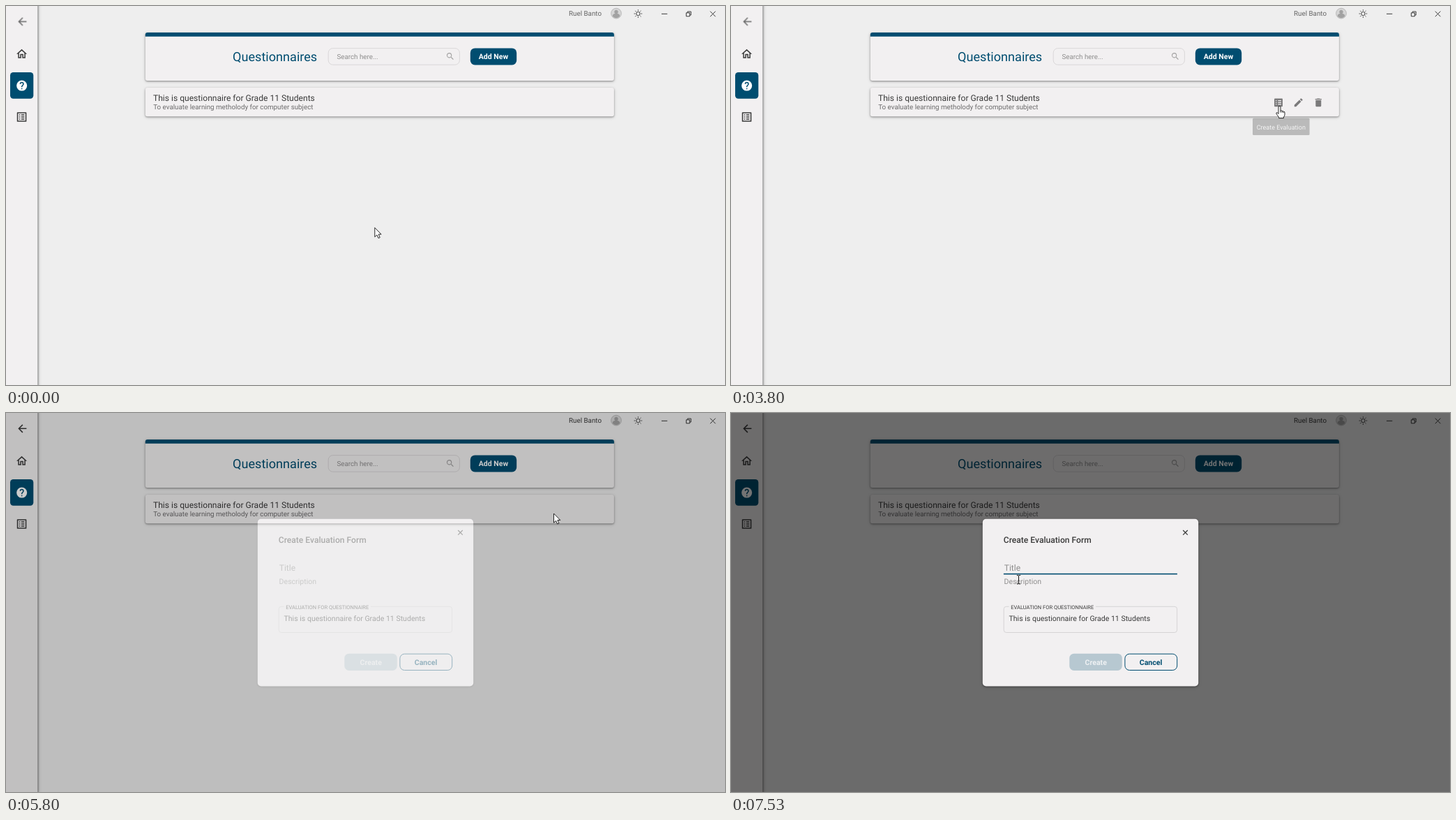
An HTML page for the animation above (8000 ms loop, 1031x543 px).

```html
<!DOCTYPE html>
<html lang="en">
<head>
<meta charset="utf-8">
<title>Questionnaires</title>
<style>
  html, body { margin: 0; width: 100%; height: 100%; overflow: hidden; background: #eee; }
  svg { display: block; width: 1031px; height: 543px; font: 9.81px Roboto, sans-serif; text-rendering: geometricPrecision; }
  .s10 { font-size: 7.55px; }
  .s12 { font-size: 9.06px; }
  .s14 { font-size: 10.57px; }
  .s16 { font-size: 12.08px; }
  .s24 { font-size: 18.11px; }
  .medium { font-weight: 500; }
  .bold { font-weight: 700; }
  .mid { text-anchor: middle; }
  .paper { fill: #f2f0f1; }
  .navy { fill: #004d70; }
  .dark { fill: #3a3a3a; }
  .grey { fill: #6c6b6c; }
  .hint { fill: #8f8e8e; }
  .line { fill: none; stroke: #3a3a3a; }
  .shadow { filter: drop-shadow(0 1px 1px rgba(0,0,0,.32)) drop-shadow(0 1px 2px rgba(0,0,0,.18)); }
  .side { filter: drop-shadow(1px 0 1px rgba(0,0,0,.4)) drop-shadow(1px 0 2px rgba(0,0,0,.18)); }
  .pointer { fill: #fff; stroke: #111; stroke-width: .9; stroke-linejoin: round; }
</style>
</head>
<body>
<svg viewBox="0 0 1031 543">
  <defs>
    <path id="i-back" d="M20 11H7.83l5.59-5.59L12 4l-8 8 8 8 1.41-1.41L7.83 13H20z"/>
    <path id="i-home" d="M12 5.69l5 4.5V18h-2v-6H9v6H7v-7.81l5-4.5M12 3L2 12h3v8h6v-6h2v6h6v-8h3z"/>
    <path id="i-help" d="M12 2a10 10 0 1 0 0 20 10 10 0 0 0 0-20zm1 17h-2v-2h2zm2.07-7.75l-.9.92C13.45 12.9 13 13.5 13 15h-2v-.5c0-1.1.45-2.1 1.17-2.83l1.24-1.26c.37-.36.59-.86.59-1.41a2 2 0 0 0-4 0H8a4 4 0 0 1 8 0c0 .88-.36 1.68-.93 2.25z"/>
    <path id="i-list" fill-rule="evenodd" d="M3.9 3h16.2q.9 0 .9.9v16.2q0 .9-.9.9H3.9q-.9 0-.9-.9V3.9q0-.9.9-.9zM5 5v14h14V5zM11 7h6v2h-6zm0 4h6v2h-6zm0 4h6v2h-6zM7 7h2v2H7zm0 4h2v2H7zm0 4h2v2H7z"/>
    <path id="i-form" fill-rule="evenodd" d="M4.5 3h15q1.5 0 1.5 1.5v15q0 1.5-1.5 1.5h-15Q3 21 3 19.5v-15Q3 3 4.5 3zM11 7h7v2h-7zm0 4h7v2h-7zm0 4h7v2h-7zM6 7h2v2H6zm0 4h2v2H6zm0 4h2v2H6z"/>
    <path id="i-edit" d="M3 17.25V21h3.75L17.81 9.94l-3.75-3.75zM20.71 7.04c.39-.39.39-1.02 0-1.41l-2.34-2.34c-.39-.39-1.02-.39-1.41 0l-1.83 1.83 3.75 3.75z"/>
    <path id="i-bin" d="M6 19q0 2 2 2h8q2 0 2-2V7H6zM19 4h-3.5l-1-1h-5l-1 1H5v2h14z"/>
    <path id="i-find" d="M15.5 14h-.79l-.28-.27A6.5 6.5 0 1 0 13.73 14.43l.27.28v.79l5 4.99L20.49 19zm-6 0a4.5 4.5 0 1 1 0-9 4.5 4.5 0 0 1 0 9z"/>
  </defs>

  <rect width="1031" height="543" fill="#eee"/>
  <rect class="paper side" y="-9" width="45.3" height="561"/>
  <use href="#i-home" class="dark" transform="translate(13.5 59.6) scale(.755)"/>
  <rect class="navy" x="6" y="95" width="33.3" height="37.8" rx="4.5"/>
  <use href="#i-help" fill="#fff" transform="translate(13.6 105) scale(.755)"/>
  <use href="#i-list" class="dark" transform="translate(13.5 150) scale(.755)"/>

  <g id="titlebar">
    <use href="#i-back" class="dark" transform="translate(14.3 13.3) scale(.755)"/>
    <text class="dark" x="807" y="14">Ruel Banto</text>
  </g>
  <circle cx="875" cy="10.6" r="7.4" fill="#d6d6d6" stroke="#aaa" stroke-width=".7"/>
  <path d="M875 5.8a2.7 2.7 0 0 1 1.5 5q3.6.6 3.9 3.8a7 7 0 0 1-10.8 0q.3-3.2 3.9-3.8a2.7 2.7 0 0 1 1.5-5z" fill="#a2a2a2"/>
  <circle class="line" cx="906.4" cy="11" r="2.7"/>
  <path id="rays" class="line"/>
  <path class="line" d="M940 11.3h8.3M975.4 9.8h5v5h-5zM977.2 9.6V8h5v5h-1.6M1009.8 7.6l7.6 7.6m0-7.6l-7.6 7.6"/>

  <rect class="paper shadow" x="199.8" y="38" width="672.1" height="69" rx="3"/>
  <path class="navy" d="M199.8 43.8V41q0-3 3-3h666.1q3 0 3 3v2.8z"/>
  <text class="navy s24" x="325" y="79.4">Questionnaires</text>
  <rect x="462.2" y="60.6" width="188.2" height="23.6" rx="6.5" fill="none" stroke="#d3d1d2" stroke-width=".8"/>
  <text class="hint" x="474.4" y="75.6">Search here...</text>
  <use href="#i-find" fill="#a3a2a2" transform="translate(630.2 65.3) scale(.57)"/>
  <rect class="navy" x="665.8" y="60.4" width="66.4" height="24" rx="6.5"/>
  <text class="bold s14 mid" x="699" y="76.3" fill="#fff">Add New</text>

  <rect class="paper shadow" x="199.8" y="117" width="672.1" height="41.2" rx="3"/>
  <text class="dark s16" x="211" y="136.2">This is questionnaire for Grade 11 Students</text>
  <text class="grey" x="211.2" y="148">To evaluate learning metholody for computer subject</text>
  <g id="actions" fill="#7b7a7b">
    <use id="form" href="#i-form" transform="translate(777.1 130.4) scale(.66)"/>
    <use href="#i-edit" transform="translate(805.8 130.4) scale(.66)"/>
    <use href="#i-bin" transform="translate(834.4 130.4) scale(.66)"/>
  </g>
  <g id="tooltip">
    <rect x="748" y="160.8" width="81.6" height="24.2" rx="1.5" fill="#616161"/>
    <text class="s12 mid" x="788.8" y="176.7" fill="#fff">Create Evaluation</text>
  </g>

  <g id="dialog">
    <rect width="1031" height="543" opacity=".55"/>
    <rect class="paper shadow" x="360.8" y="151.8" width="309.4" height="239.6" rx="5"/>
    <path class="line" d="M648.2 168l6.6 6.6m0-6.6l-6.6 6.6" stroke-width="1.3"/>
    <text class="dark medium s16" x="390.8" y="185.7">Create Evaluation Form</text>
    <text class="hint s16" x="391.7" y="225.8">Title</text>
    <rect id="underline" class="navy" y="229.8" height="1.6"/>
    <rect id="caret" x="392" y="214" width=".9" height="15" fill="#222"/>
    <text class="hint s14" x="391.6" y="244.6">Description</text>
    <path d="M398.6 277.3H394.8q-3.6 0-3.6 3.6v30q0 3.6 3.6 3.6h241.200q3.600 0 3.600-3.600v-30q0-3.600-3.600-3.600H523" fill="none" stroke="#cfcdce" stroke-width=".8"/>
    <text class="dark s10" x="401.2" y="280.6">EVALUATION FOR QUESTIONNAIRE</text>
    <text class="dark s14" x="398.5" y="298.2">This is questionnaire for Grade 11 Students</text>
    <rect x="485.3" y="344.7" width="75.5" height="24.2" rx="6.5" fill="#b7c8d1"/>
    <text class="bold s14 mid" x="523.2" y="360.6" fill="#eef1f3">Create</text>
    <rect x="564.9" y="345.2" width="74.800" height="23.300" rx="6.5" fill="none" stroke="#004d70"/>
    <text class="navy bold s14 mid" x="602" y="360.6">Cancel</text>
  </g>

  <g id="cursor">
    <path id="arrow" class="pointer" d="M0 0V13.200L3.100 10.400 5.200 15 7.400 14.100 5.400 9.500H9.300z"/>
    <path id="hand" class="pointer" d="M-.5 1Q-.5-.5 1-.5T2.500 1V6Q4 5.300 4.800 6.500 6.200 6 6.800 7.300 8.500 7 8.500 8.700V11.500Q8.500 13.500 7 15V16.600H0V15.200Q-2.200 12.500-3.600 10.100-3.800 8.500-2.200 8.700L-.5 10.500zM2.500 6V8.600M4.800 6.500V8.800M6.800 7.300V9"/>
    <path id="beam" fill="none" stroke="#111" d="M-2.600-6.200H-.6L0-5.600.6-6.200H2.600M0-5.600V5.600M-2.600 6.200H-.6L0 5.600.6 6.200H2.600"/>
  </g>
</svg>
<script>
const $ = id => document.getElementById(id);
const LOOP = 8000, FPS = 15;

// Pointer hot spot: tick, x, y
const path = [
  [14, 528.8, 317.6], [15, 532, 322], [17, 570, 341], [19, 645, 325], [21, 728, 268], [23, 779, 210], [24, 792.3, 197.600],
  [26, 792.3, 197.600], [27, 783, 189], [28, 752, 171], [29, 705, 156], [31, 641.300, 148],
  [34, 641.300, 148], [37, 682, 142], [41, 764, 140], [44, 785.500, 144],
  [64, 785.500, 144], [65, 782, 150], [66, 784, 158.500], [67, 788.500, 151], [68, 785.500, 144],
  [90, 785.500, 144], [93, 730, 225], [96, 590, 312], [99, 450, 268], [101, 408, 224],
  [102, 408, 224], [105, 409, 222], [107, 410, 227], [109, 412.500, 238.700]
];

const clamp = v => Math.max(0, Math.min(1, v));
const show = (id, on) => $(id).setAttribute('opacity', +on);

function pointerAt(tick) {
  const i = path.findIndex(p => p[0] > tick);
  if (i === 0) return path[0].slice(1);
  if (i < 0) return path.at(-1).slice(1);
  const [a, b] = [path[i - 1], path[i]];
  const u = (tick - a[0]) / (b[0] - a[0]);
  return [a[1] + (b[1] - a[1]) * u, a[2] + (b[2] - a[2]) * u];
}

// Fade that covers about three ticks
const fadeIn = (tick, start) => clamp(.36 + (tick - start) * .42) * (tick >= start);

function render(ms) {
  const tick = Math.floor((ms + 4) * FPS / 1000);
  const [x, y] = pointerAt(tick);
  $('cursor').setAttribute('transform', `translate(${x} ${y})`);
  const beam = tick >= 100, hand = tick >= 43 && tick < 85;
  show('beam', beam);
  show('hand', hand);
  show('arrow', !beam && !hand);

  show('titlebar', tick < 84 ? .76 : 1);
  show('actions', tick >= 29 && tick < 87);
  show('form', tick < 85 ? 1 : .45);
  show('tooltip', tick < 83 ? fadeIn(tick, 57) : clamp((85 - tick) * .35));
  show('dialog', fadeIn(tick, 87));

  const grow = 1 - (1 - clamp((tick - 104.500) / 3)) ** 3;
  $('underline').setAttribute('x', 515.4 - 124.500 * grow);
  $('underline').setAttribute('width', 249 * grow);
  show('caret', tick >= 105 && tick < 113);
}

$('rays').setAttribute('d', Array.from({ length: 8 }, (_, i) => {
  const c = Math.cos(i * Math.PI / 4), s = Math.sin(i * Math.PI / 4);
  return `M${906.4 + 4.2 * c} ${11 + 4.2 * s}L${906.4 + 5.8 * c} ${11 + 5.8 * s}`;
}).join(''));

const start = performance.now();
(function loop() {
  render((performance.now() - start) % LOOP);
  requestAnimationFrame(loop);
})();
</script>
</body>
</html>
```
